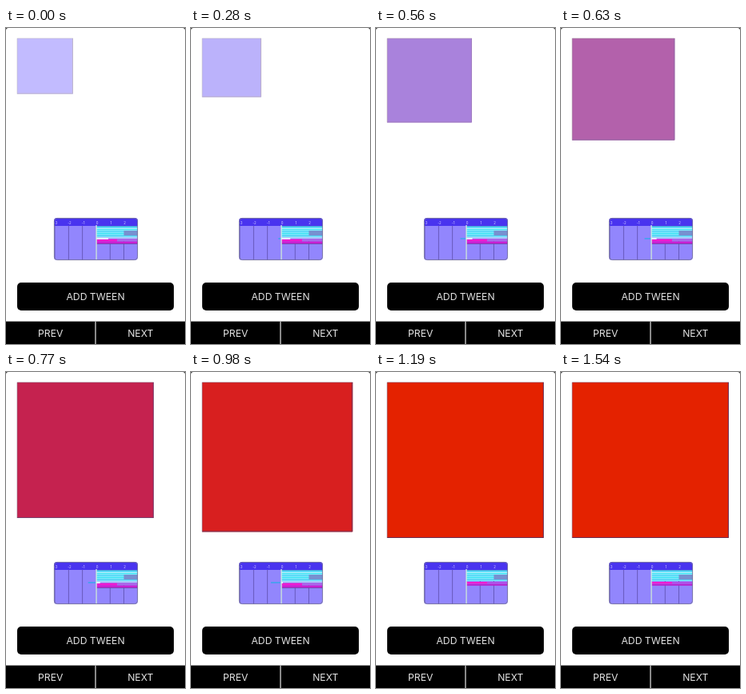
An HTML page for the animation above (1680 ms loop, 224x396 px).

```html
<!DOCTYPE html>
<html lang="en">
<head>
<meta charset="utf-8">
<title>Tween timeline</title>
<style>
html, body { margin: 0; width: 100%; height: 100%; overflow: hidden; background: #fff; }
svg { display: block; width: 100vw; height: 100vh; }
text { fill: #e4e4e4; text-anchor: middle; font-family: Inter, Roboto, sans-serif; }
.label { font-size: 12.2px; }
.tick { font-size: 4.3px; fill: #d5d0ff; }
</style>
</head>
<body>
<svg viewBox="0 0 224 396">
  <defs><clipPath id="card"><rect x="60" y="238" width="105" height="53" rx="4"/></clipPath></defs>
  <rect width="224" height="396" fill="#fff"/>
  <path d="M0 0H3Q0 0 0 3ZM224 0H221Q224 0 224 3Z" fill="#222"/>

  <rect id="box" x="14" y="13"/>
  <path id="edge" fill="none" stroke-opacity=".6"/>
  <path id="shade" fill="none"/>

  <g clip-path="url(#card)">
    <rect x="60" y="238" width="105" height="53" fill="#9286fd"/>
    <rect x="60" y="238" width="105" height="10" fill="#4934ef"/>
    <g id="ticks"></g>
    <g id="tracks"></g>
    <g id="active">
      <rect x="113" y="262" width="52" height="2" fill="#a9c8fa"/>
      <rect x="113" y="264" width="52" height="3.5" fill="#a968ea"/>
      <rect x="113" y="264.7" width="26" height="3" fill="#f01ad0"/>
      <rect x="113" y="267.5" width="52" height="3" fill="#c81fd2"/>
      <rect x="113" y="270.3" width="52" height=".7" fill="#65469f"/>
      <rect id="past" y="263" height="1.8" fill="#48a0f0"/>
      <rect id="future" x="113" y="263" height="1.8" fill="#e8faff"/>
    </g>
    <g id="idle">
      <rect x="113" y="263" width="52" height="4" fill="#b050e6"/>
      <rect x="113" y="263" width="26" height="2.2" fill="#f21ad0"/>
      <rect x="113" y="266" width="52" height="1.7" fill="#b81fcc"/>
    </g>
    <rect x="112.4" y="247" width="1.3" height="44" fill="#d9f2e8"/>
  </g>
  <rect x="60.4" y="238.4" width="104.2" height="52.2" rx="4" fill="none" stroke="#77739a" stroke-width=".9"/>

  <rect x="14" y="319" width="196" height="35" rx="5"/>
  <text class="label" x="112" y="341.2">ADD TWEEN</text>
  <rect y="367.7" width="224" height="28.3"/>
  <rect x="111.3" y="367.7" width="1.4" height="28.3" fill="#c4c4c4"/>
  <text class="label" x="55.7" y="386.7">PREV</text>
  <text class="label" x="168.3" y="386.7">NEXT</text>
</svg>
<script>
const LOOP = 1680, STEP = 70, TRAVEL = 1190;
const $ = id => document.getElementById(id);

function put(parent, tag, attrs, text = '') {
  const el = document.createElementNS('http://www.w3.org/2000/svg', tag);
  for (const k in attrs) el.setAttribute(k, attrs[k]);
  el.textContent = text;
  parent.append(el);
}
function set(id, attrs) {
  for (const k in attrs) $(id).setAttribute(k, attrs[k]);
}

for (let n = -3; n <= 2; n++) {
  const x = 114 + n * 17.3;
  put($('ticks'), 'text', { class: 'tick', x, y: 245.5 }, n);
  put($('ticks'), 'rect', { x: x - 1.5, y: 248, width: .9, height: 43, fill: '#6355b5' });
}
const track = (x, y, w, h, fill) => put($('tracks'), 'rect', { x, y, width: w, height: h, fill });
track(113, 248, 52, 14, '#8ce9fb');
for (let i = 0; i < 5; i++) track(113, 249 + i * 2.6, 52, 1.5, i % 2 ? '#3ce4f3' : '#51d5f7');
track(113, 248, 52, .8, '#3a8fd0');
track(113, 251.2, 52, .8, '#c8f6fd');
track(147.5, 254, 17.5, 6, '#7790d0');
track(113, 260, 52, 1.2, '#52d0f4');

// Piecewise linear lookup over [position, ...values] stops
function along(stops, t) {
  let i = 1;
  while (i < stops.length - 1 && t > stops[i][0]) i++;
  const a = stops[i - 1], b = stops[i];
  const k = Math.min(1, Math.max(0, (t - a[0]) / (b[0] - a[0])));
  return a.slice(1).map((v, j) => v + (b[j + 1] - v) * k);
}
const ease = x => x < .5 ? 4 * x ** 3 : 1 - 4 * (1 - x) ** 3;
const rgb = c => `rgb(${c.map(Math.round)})`;

const pace = [[0, 0], [280, .2], [560, .415], [770, .632], [980, .752], [1120, 1]];
const fills = [
  [0, 194, 187, 255], [.032, 187, 178, 251], [.286, 169, 130, 220],
  [.8, 197, 34, 79], [.94, 216, 31, 31], [1, 228, 34, 0]
];

function draw(ms) {
  const t = Math.floor(ms % LOOP / STEP) * STEP;
  const p = ease(along(pace, t)[0]);
  const size = 70 + 126 * p, end = 14 + size, low = 12.6 + size - .6 * p;
  const moving = t < TRAVEL;
  set('box', { width: size, height: low - 13, fill: rgb(along(fills, p)) });
  set('edge', {
    d: `M14 ${low}V13H${end}`,
    stroke: rgb(along([[0, 190, 183, 200], [1, 130, 85, 110]], p))
  });
  set('shade', {
    d: `M14 ${low - .5}H${end - .5}V13`,
    stroke: rgb(along([[0, 190, 182, 204], [.3, 158, 120, 190], [1, 105, 45, 80]], p))
  });
  const lead = 14 * Math.min(1, t / 1050);
  set('past', { x: 113 - lead, width: Math.min(lead, 13) });
  set('future', { width: Math.max(0, 15 - lead) });
  set('active', { visibility: moving ? 'visible' : 'hidden' });
  set('idle', { visibility: moving ? 'hidden' : 'visible' });
}

const start = performance.now();
function tick() {
  draw(performance.now() - start);
  requestAnimationFrame(tick);
}
draw(0);
requestAnimationFrame(tick);
</script>
</body>
</html>
```
